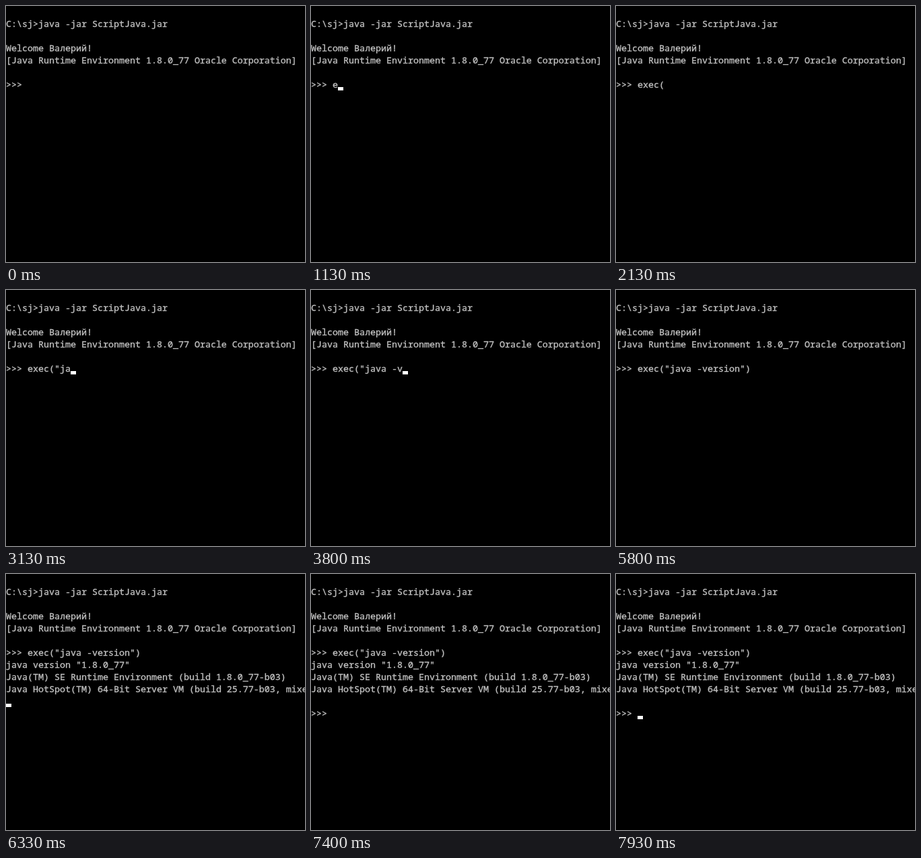
Animation of 444x379 px, one loop 8000 ms. Source, as an HTML page:

```html
<!DOCTYPE html>
<html lang="en">
<head>
<meta charset="utf-8">
<title>Console session</title>
<style>
  html, body { margin: 0; width: 100%; height: 100%; overflow: hidden; background: #000; }
  svg { display: block; }
  text {
    font: 13.3333px "Noto Sans Mono", "DejaVu Sans Mono", monospace;
    fill: #c0c0c0; stroke: #c0c0c0; stroke-width: .35px; white-space: pre;
  }
</style>
</head>
<body>
<svg id="stage" width="444" height="379" viewBox="0 0 444 379">
  <rect width="444" height="379" fill="#000"/>
</svg>
<script>
const LOOP = 8000, CELL = 8, ROW = 18, BASE = 31;
const PROMPT = '>>> ';
const HEADER = [
  'C:\\sj>java -jar ScriptJava.jar',
  '',
  'Welcome Валерий!',
  '[Java Runtime Environment 1.8.0_77 Oracle Corporation]',
  ''
];
const OUTPUT = [
  'java version "1.8.0_77"',
  'Java(TM) SE Runtime Environment (build 1.8.0_77-b03)',
  'Java HotSpot(TM) 64-Bit Server VM (build 25.77-b03, mixed mode)',
  ''
];
const OUTPUT_AT = 6330, PROMPT_AT = 6470;

// Each burst is typed evenly from its first key to its last.
const BURSTS = [
  { text: 'exec(', from: 930, to: 1870 },
  { text: '"', from: 2600 },
  { text: 'java ', from: 3000, to: 3330 },
  { text: '-', from: 3530 },
  { text: 'versio', from: 3800, to: 4530 },
  { text: 'n', from: 4730 },
  { text: '")', from: 5200, to: 5530 }
];

// The cursor blinks off for a fixed time, starting at these moments.
const BLINK = 530;
const BLINK_AT = [-60, 2070, 4730, 5000, 5800, 7400];

const stage = document.getElementById('stage');

function add(name, attrs) {
  const el = document.createElementNS('http://www.w3.org/2000/svg', name);
  for (const key in attrs) el.setAttribute(key, attrs[key]);
  return stage.appendChild(el);
}

const rows = Array.from({ length: 11 }, (_, i) => add('text', { x: 0, y: BASE + i * ROW }));
const cursor = add('rect', { width: CELL, height: 5, fill: '#fff' });

function typedPart({ text, from, to = from }, t) {
  const gap = (to - from) / Math.max(1, text.length - 1);
  return [...text].filter((_, i) => t >= from + i * gap).join('');
}

function render(t) {
  const lines = [...HEADER, PROMPT + BURSTS.map(burst => typedPart(burst, t)).join('')];
  if (t >= OUTPUT_AT) lines.push(...OUTPUT);
  if (t >= PROMPT_AT) lines.push(PROMPT);

  rows.forEach((row, i) => {
    const line = lines[i] || '';
    if (row.textContent !== line) row.textContent = line;
  });

  const last = lines.length - 1;
  const hidden = BLINK_AT.some(at => t >= at && t < at + BLINK);
  cursor.setAttribute('x', lines[last].length * CELL);
  cursor.setAttribute('y', BASE + last * ROW - 1);
  cursor.setAttribute('visibility', hidden ? 'hidden' : 'visible');
}

const start = performance.now();
function tick() {
  render((performance.now() - start) % LOOP);
  requestAnimationFrame(tick);
}
tick();
</script>
</body>
</html>
```
